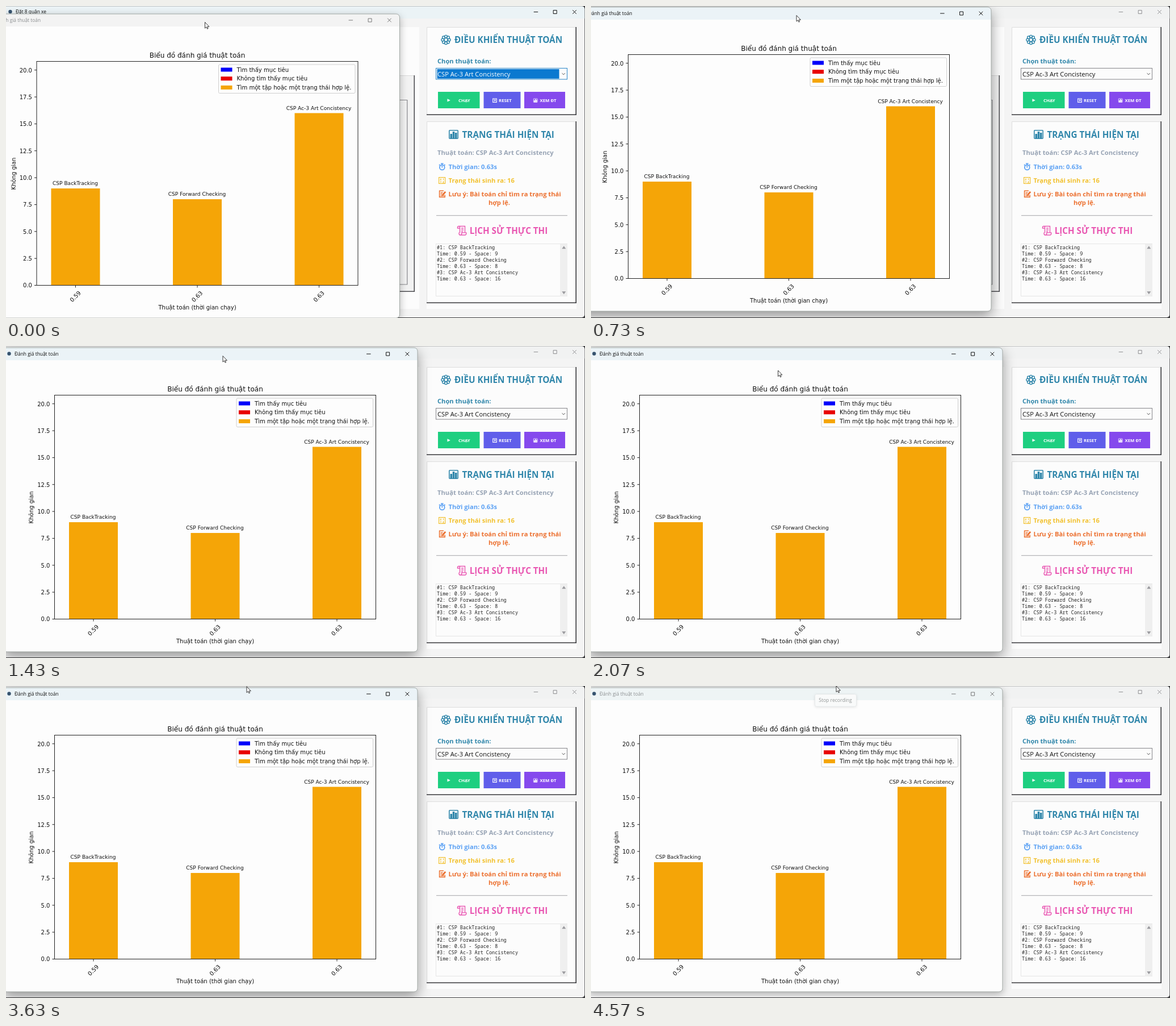
Animation, 1020 px wide and 549 px high, one loop 4610 ms. Source, as an HTML page:

```html
<!DOCTYPE html>
<html lang="vi">
<head>
<meta charset="utf-8">
<title>Đánh giá thuật toán</title>
<style>
  html, body { margin: 0; width: 100%; height: 100%; overflow: hidden; background: #3a3a3c; }
  svg { display: block; width: 100vw; height: 100vh; }
  text { font-family: "Open Sans", "Noto Sans", sans-serif; white-space: pre; }
  .plot text { font-family: "DejaVu Sans", sans-serif; font-size: 10.06px; fill: #111; }
  .mono { font-family: "Noto Sans Mono", "DejaVu Sans Mono", monospace; font-size: 8.52px; fill: #222; }
  .bold { font-weight: 700; }
  .line { fill: none; stroke-width: 1; }
</style>
</head>
<body>
<svg id="stage" viewBox="0 0 1020 549" preserveAspectRatio="none"></svg>
<script>
const LOOP = 4610, ACTIVATE = 270, DEACTIVATE = 4230;
const TEAL = '#3187ab', BLUE = '#5da2f4', YELLOW = '#f2c12e', ORANGE = '#ec702f', PINK = '#e957b2';

const rect = (x, y, w, h, fill, extra = '') =>
  `<rect x="${x}" y="${y}" width="${w}" height="${h}" fill="${fill}" ${extra}/>`;
const path = (d, stroke, width = 1, extra = '') =>
  `<path d="${d}" fill="none" stroke="${stroke}" stroke-width="${width}" ${extra}/>`;
const text = (x, y, s, size, fill, extra = '') =>
  `<text x="${x}" y="${y}" font-size="${size}" fill="${fill}" ${extra}>${s}</text>`;
const bold = (x, y, s, size, fill, extra = '') => text(x, y, s, size, fill, 'class="bold" ' + extra);
const middle = 'text-anchor="middle"';

// Minimize, maximize and close glyphs, centred on the maximize box.
const windowButtons = (x, y, id) =>
  `<g id="${id}" class="line">
    <path d="M${x - 37.5} ${y}h7.5M${x - 3} ${y - 3}h6v6h-6zM${x + 31} ${y - 3.3}l6.6 6.6m0-6.6l-6.6 6.6"/>
  </g>`;

const card = (y, h) =>
  rect(741, y, 264, h, '#fcfcfc') +
  path(`M741.5 ${y + h}V${y + .5}H1004`, '#dedede') +
  path(`M741 ${y + h - .8}H1004.2V${y}`, '#38383c', 1.6);

function rosette(cx, cy) {
  let petals = '';
  for (let i = 0; i < 8; i++) {
    const a = i * Math.PI / 4;
    petals += `<circle cx="${cx + 5.7 * Math.cos(a)}" cy="${cy + 5.7 * Math.sin(a)}" r="2.4"/>`;
  }
  return `<g fill="none" stroke="${TEAL}" stroke-width="1.4">${petals}<circle cx="${cx}" cy="${cy}" r="3.1"/></g>`;
}

const barIcon = (x, y, s, color) =>
  `<g transform="translate(${x} ${y}) scale(${s})">` +
  rect(.8, .8, 15.4, 14.4, 'none', `stroke="${color}" stroke-width="1.6" rx="1"`) +
  rect(2.5, 7, 3.6, 8, color) + rect(6.7, 3, 3.6, 12, color) + rect(10.9, 5, 3.6, 10, color) + '</g>';

const icons = () => rosette(775, 59.5) + barIcon(780, 218, 1, TEAL) +
  // stopwatch
  `<circle cx="768.3" cy="284" r="4.4" fill="none" stroke="${BLUE}" stroke-width="1.8"/>` +
  path('M768.3 284.5v-3.5M766 277.4h4.6M768.3 277.4v2M772 279l1.6 1.4M764.6 279l-1.6 1.4', BLUE, 1.7) +
  // number grid
  rect(762.6, 301.6, 11, 10.8, 'none', `stroke="${YELLOW}" stroke-width="1.2"`) +
  path('M766 303.3v3M770.5 303.3v3M766 308v3M770.5 308v3M764.4 306h2.6M769 311h2.6', YELLOW, 1.1) +
  // memo
  path('M771 325.3h-7.4v11h9.6v-4M765.5 328.5h4M765.5 331h2.5M765.5 333.7h6', ORANGE, 1.5) +
  path('M768.8 333l5.4-6.2', ORANGE, 2.8) +
  // scroll
  path('M799.5 399V389.5q0-2-2-2t-2 2v1.5h4M797.5 387.5h11v11M802 391h4M802 394h4M802 397h3M800.5 403h8q2.3 0 2.3-2.4v-1.7h-8v1.7q0 2.4-2.3 2.4t-2.4-2.4v-2', PINK, 1.4);

const button = (x, w, fill, labelX, label) =>
  rect(x, 151, w, 29, fill) + bold(labelX, 168.6, label, 7.8, '#fff');

function mainWindow() {
  const history = ['#1: CSP BackTracking', 'Time: 0.59 - Space: 9', '#2: CSP Forward Checking',
    'Time: 0.63 - Space: 8', '#3: CSP Ac-3 Art Concistency', 'Time: 0.63 - Space: 16'];
  return rect(-10, .5, 1029.3, 547.5, '#f4f4f4', 'rx="5"') +
    `<path id="mainBar" d="M-10 .5H1014.3q5 0 5 5V22H-10z"/>` +
    '<circle cx="7.5" cy="10" r="3.2" fill="#36536f"/>' +
    text(17, 13.3, 'Đặt 8 quân xe', 8.4, '#111', 'id="mainTitle"') +
    windowButtons(967.2, 10.5, 'mainButtons') +
    // board area
    rect(-10, 37, 738, 496, '#fcfcfc') + rect(-10, 122, 730, 381, '#f2f2f2') +
    path('M0 122.5H719', '#d9d9d9') + path('M0 502.2H719.3V122', '#4c4c50', 1.6) +
    path('M0 165.5H706.8V490H0', '#858589', 1.2) +
    // control card
    rect(741, 523, 264, 10, '#fcfcfc') + card(37, 155) +
    bold(790, 65, 'ĐIỀU KHIỂN THUẬT TOÁN', 15.3, TEAL) +
    bold(760, 101, 'Chọn thuật toán:', 11.15, TEAL) +
    rect(757.5, 109.5, 231, 19.5, '#fcfcfc', 'id="combo"') +
    rect(759.5, 111, 215, 16.8, '#0b79d0', 'id="selection"') +
    text(760, 124, 'CSP Ac-3 Art Concistency', 11.15, '#111', 'id="comboText"') +
    path('M979.5 118.2l2.7 2.6 2.7-2.6', '#555') +
    button(761, 73.5, '#1ecf80', 797, 'CHẠY') + '<path d="M777.5 163.3l5.3 2.6-5.3 2.6z" fill="#fff"/>' +
    button(841.5, 65, '#605eea', 868, 'RESET') +
    path('M857.7 163h6.6v6.4h-6.6zM859.3 165h3.4M860 167.3l2.6-1.6', '#fff', 1.1) +
    button(913, 72, '#8549ed', 940.5, 'XEM ĐT') + barIcon(929, 162.7, .44, '#fff') +
    // status card
    card(203, 320) +
    bold(803.5, 232, 'TRẠNG THÁI HIỆN TẠI', 15.3, TEAL) +
    bold(760, 262.3, 'Thuật toán: CSP Ac-3 Art Concistency', 11.18, '#97a3b4') +
    bold(779.5, 286.6, 'Thời gian: 0.63s', 11.18, BLUE) +
    bold(779.5, 310.8, 'Trạng thái sinh ra: 16', 11.18, YELLOW) +
    bold(779.5, 335, 'Lưu ý: Bài toán chỉ tìm ra trạng thái', 11.18, ORANGE) +
    bold(869, 350.3, 'hợp lệ.', 11.18, ORANGE, middle) +
    path('M758 368.7H989', '#a4a4a8') +
    bold(885.5, 400.8, 'LỊCH SỬ THỰC THI', 15.2, PINK, middle) +
    rect(757.5, 418.5, 231, 92, '#fcfcfc', 'stroke="#e6e6e6"') + rect(976, 419, 13, 91.5, '#efefef') +
    '<path d="M979.3 427.3h7l-3.5-5zM979.3 502.3h7l-3.5 5z" fill="#9b9b9f"/>' +
    history.map((s, i) => `<text class="mono" x="759" y="${428.2 + i * 10.9}">${s}</text>`).join('') +
    icons();
}

function plot() {
  const left = 85.5, right = 651.5, top = 86.5, bottom = 480.5, unit = 18.94;
  const bars = [[154, 9, '0.59', 'CSP BackTracking'], [368.5, 8, '0.63', 'CSP Forward Checking'],
    [583, 16, '0.63', 'CSP Ac-3 Art Concistency']];
  const legend = [['#0000fa', 'Tìm thấy mục tiêu'], ['#e80000', 'Không tìm thấy mục tiêu'],
    ['#f5a507', 'Tìm một tập hoặc một trạng thái hợp lệ.']];
  let out = '';
  for (const [x, value, time, name] of bars) {
    const y = bottom - value * unit;
    out += rect(x - 43, y, 86, bottom - y, '#f5a507') +
      `<text x="${x - .5}" y="${y - 5.7}" ${middle} style="font-size:9.06px">${name}</text>` +
      path(`M${x} ${bottom}v4`, '#222') +
      `<text transform="translate(${x - .5} 500) rotate(-45)" y="3.6" ${middle}>${time}</text>`;
  }
  for (let v = 0; v <= 20; v += 2.5) {
    const y = bottom - v * unit;
    out += path(`M${left - 4} ${y}h4`, '#222') +
      `<text x="77.5" y="${y + 3.9}" text-anchor="end">${v.toFixed(1)}</text>`;
  }
  out += rect(left, top, right - left, bottom - top, 'none', 'stroke="#222"') +
    rect(406, 92, 240.5, 50.5, '#fdfdfd', 'rx="2" stroke="#cfcfcf"');
  legend.forEach(([color, label], i) => {
    const y = 101 + i * 15.7;
    out += rect(410, y - 3.5, 20, 7, color) + `<text x="438" y="${y + 3.7}">${label}</text>`;
  });
  return `<g class="plot">${out}
    <text x="368.5" y="80.3" ${middle} style="font-size:12.06px">Biểu đồ đánh giá thuật toán</text>
    <text x="368.5" y="523.3" ${middle}>Thuật toán (thời gian chạy)</text>
    <text transform="translate(48 284) rotate(-90)" ${middle}>Không gian</text></g>`;
}

const chartWindow = () =>
  rect(-5, 3, 730, 535, '#fdfdfd', 'id="frame" rx="6"') +
  '<path id="chartBar" d="M-5 25V9q0-6 6-6H719q6 0 6 6V25z"/>' +
  rect(-5, 3, 730, 535, 'none', 'rx="6" stroke="#9aa29e" stroke-width=".9"') +
  '<circle cx="5.5" cy="13.5" r="3.2" fill="#36536f"/>' +
  text(15, 17, 'Đánh giá thuật toán', 8.4, '#111', 'id="chartTitle"') +
  windowButtons(672.6, 14, 'chartButtons') + plot();

const tooltip = () => '<g id="tooltip">' +
  rect(394.5, 14.5, 73, 21.5, '#f9fafa', 'rx="3" stroke="#e6e9ea" style="filter:drop-shadow(0 1px 2px rgba(0,0,0,.1))"') +
  text(430.5, 28.3, 'Stop recording', 8.6, '#939797', middle) + '</g>';

const stage = document.getElementById('stage');
stage.innerHTML = mainWindow() + `<g id="chart">${chartWindow()}</g>` + tooltip() +
  '<path id="cursor" d="M0 0V10.6L2.5 8.4 4 11.8 5.6 11.1 4.1 7.8H7.4Z" fill="#fff" stroke="#222" stroke-width=".9"/>';
const $ = id => document.getElementById(id);
const set = (id, attrs) => { for (const k in attrs) $(id).setAttribute(k, attrs[k]); };

// Keys are [time, x, y].
const windowKeys = [[0, -31.5, 11], [400, -31.5, 11], [470, -31, 7.5], [590, -28, 1], [730, -20, -1],
  [950, -7, 0], [1150, 0, 0]];
const cursorKeys = [[1600, 382, 17.5], [1900, 350, 35], [2450, 284, 60], [2800, 284, 60],
  [3200, 355, 32], [3520, 420, 3], [3630, 424, 1], [3950, 432, 0]];

function along(keys, t) {
  const i = keys.findIndex(k => k[0] > t);
  if (i < 0) return keys[keys.length - 1].slice(1);
  if (i === 0) return keys[0].slice(1);
  const [a, b] = [keys[i - 1], keys[i]], p = (t - a[0]) / (b[0] - a[0]);
  return [1, 2].map(n => Math.round(2 * (a[n] + (b[n] - a[n]) * p)) / 2);
}

function draw(t) {
  const clicked = t >= ACTIVATE, active = clicked && t < DEACTIVATE;
  const [dx, dy] = along(windowKeys, t);
  const [cx, cy] = t < cursorKeys[0][0] ? [382 + dx, 17.5 + dy] : along(cursorKeys, t);

  set('chart', { transform: `translate(${dx} ${dy})` });
  set('cursor', { transform: `translate(${cx} ${cy})` });
  set('chartBar', { fill: active ? '#ebf3f7' : clicked ? '#eef4f5' : '#f3f3f3' });
  set('chartTitle', { fill: active ? '#111' : '#8c8f91' });
  set('chartButtons', { stroke: active ? '#111' : '#777' });
  $('frame').style.filter = active
    ? 'drop-shadow(0 8px 11px rgba(0,0,0,.4))'
    : 'drop-shadow(0 4px 7px rgba(0,0,0,.3))';

  set('mainBar', { fill: clicked ? '#f1f2f2' : '#ebf3f6' });
  set('mainTitle', { fill: clicked ? '#8c8f91' : '#111' });
  set('mainButtons', { stroke: clicked ? '#8f8f92' : '#111' });
  set('combo', { stroke: clicked ? '#85858a' : '#2a86c8' });
  set('selection', { opacity: clicked ? 0 : 1 });
  set('comboText', { fill: clicked ? '#111' : '#fff' });
  set('tooltip', { opacity: Math.max(0, Math.min(1, (t - 4400) / 150)) });
}

const start = performance.now();
function tick() {
  draw((performance.now() - start) % LOOP);
  requestAnimationFrame(tick);
}
tick();
</script>
</body>
</html>
```
